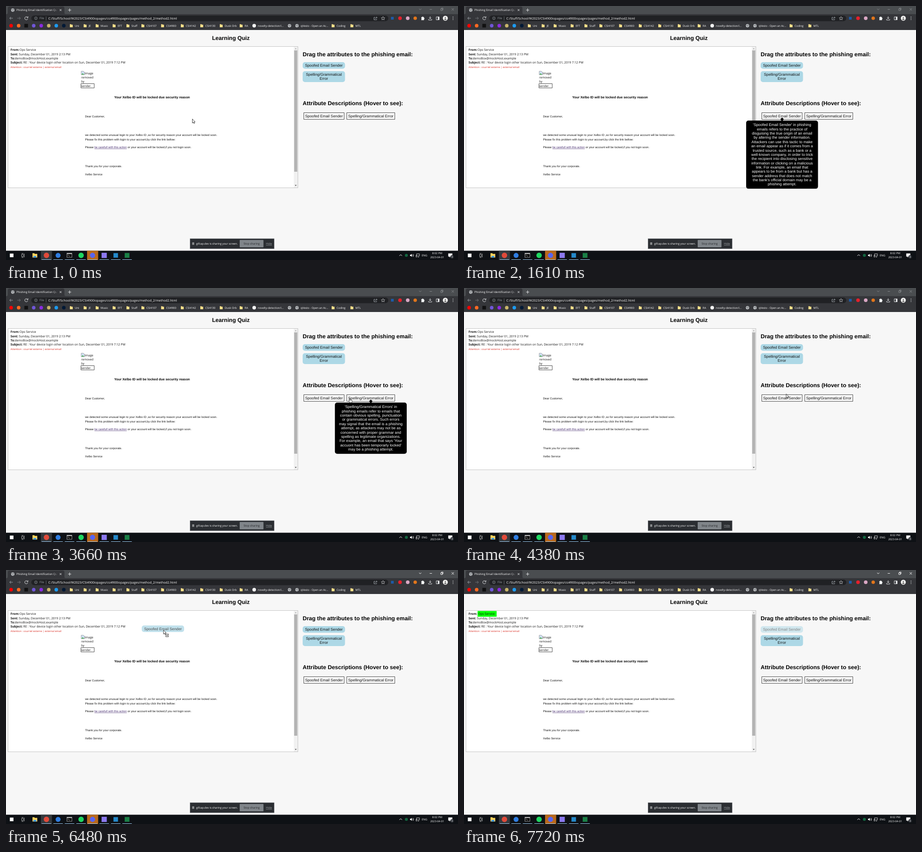
Write an HTML page that moves like this. It is 998 px wide and 561 px high and loops after 8 s.

```html
<!DOCTYPE html>
<html lang="en">
<head>
<meta charset="utf-8">
<title>Learning Quiz</title>
<style>
  html, body { margin: 0; width: 100%; height: 100%; overflow: hidden; background: #f7f7f7; }
  svg { display: block; width: 100vw; height: 100vh; text-rendering: geometricPrecision; }
  text { font-family: "Liberation Sans", Arial, sans-serif; white-space: pre; }
  .ui { font-family: "Open Sans", "Noto Sans", sans-serif; }
  .mid { text-anchor: middle; }
  .b { font-weight: 700; }
  .line { fill: none; stroke-width: 1; }
  .thin { fill: none; stroke-width: .75; }
</style>
</head>
<body>
<svg id="stage" viewBox="0 0 998 561" preserveAspectRatio="none"></svg>
<script>
const rect = (x, y, w, h, fill, more = '') => `<rect x="${x}" y="${y}" width="${w}" height="${h}" fill="${fill}" ${more}/>`;
const dot = (x, y, r, fill) => `<circle cx="${x}" cy="${y}" r="${r}" fill="${fill}"/>`;
const square = (x, y, size, fill) => rect(x - size / 2, y - size / 2, size, size, fill);
const line = (d, stroke, cls = 'line') => `<path class="${cls}" d="${d}" stroke="${stroke}"/>`;
const thin = (d, stroke) => line(d, stroke, 'thin');
const shape = (d, fill, more = '') => `<path d="${d}" fill="${fill}" ${more}/>`;
const text = (x, y, str, size, fill = '#000', cls = '', more = '') =>
  `<text x="${x}" y="${y}" font-size="${size}" fill="${fill}" class="${cls}" ${more}>${str}</text>`;
const ui = (x, y, str, size = 6.07, fill = '#fff', cls = '') => text(x, y, str, size, fill, 'ui ' + cls);
const group = (id, body, more = '') => `<g id="${id}" ${more}>${body}</g>`;
const bold = str => `<tspan class="b">${str}</tspan>`;
const globe = (x, y) => dot(x, y, 3.7, '#c4c7ca') +
  line(`M${x - 3} ${y - 1}l3 1 1 3M${x} ${y - 3}l1 2 2 0`, '#55585b');
const folder = (x, y) => shape(`M${x - 3} ${y - 3.3}h2.6l1 1.1h2.8v5.6h-6.4z`, '#fbe08a');

function browser() {
  const pale = '#e4e6e8', grey = '#9aa0a6';
  let s = rect(0, 0, 998, 19, '#4a4d50') + rect(0, 18, 998, 35, '#35363a');
  s += shape('M1 18q3 0 3-3V5q0-4 4-4h117q4 0 4 4v10q0 3 3 3z', '#35363a');
  s += globe(15, 9);
  s += `<defs><linearGradient id="fade" gradientUnits="userSpaceOnUse" x1="104" x2="114" y1="0" y2="0">
    <stop stop-color="#fff"/><stop offset="1" stop-color="#fff" stop-opacity="0"/></linearGradient></defs>`;
  s += ui(23, 11.2, 'Phishing Email Identification Qu', 6.07, 'url(#fade)');
  s += line('M118.500 7l4 4m0-4l-4 4M137 9h7m-3.500-3.500v7', pale);
  s += group('windowButtons', line('M912 6l2.500 2.500L917 6M935.500 7.500h5M960 6h3.500v4H960zM961.500 6V4.500h3.500v4h-1.500M984 5l5 5m0-5l-5 5', 'currentColor'));
  s += line('M15 27H8m3-3l-3 3 3 3', grey) + line('M25 27h7m-3-3l3 3-3 3', '#707478');
  s += line('M47.500 25a3.400 3.400 0 1 0 .6 3M48.500 23v2.800h-2.800', pale);
  s += rect(56, 21, 788, 12.5, '#202124', 'rx="6.2"');
  s += thin('M69 27a3 3 0 1 1-6 0a3 3 0 1 1 6 0M66 26.500v2.500M66 25v.8', grey);
  s += ui(74, 29.4, 'File', 6.4, grey) + line('M88.500 23v9', '#5f6368');
  s += ui(93.5, 29.6, 'C:/Stuff/School/W2023/CSI4900iopages/csi4900iopages/pages/method_2/method2.html', 6.95);
  s += line('M815 25h-2.500v5.500h6V29M815 28.500q0-3 4-3m-1.500-2l2 2-2 2', grey);
  s += thin('M832.500 23.300l1.200 2.500 2.700.3-2 1.900.6 2.700-2.500-1.400-2.500 1.400.6-2.700-2-1.900 2.700-.3z', pale);
  s += square(853, 27, 6, '#1d5aa6') + dot(870, 27, 4, '#e4202c') + dot(887, 27, 4, '#d9a7c4') + dot(903.5, 27, 3.8, '#e2761b');
  s += shape('M917 24.500h2v-1h2v1h2v2.300h1v2h-1v2.400h-6v-2q1.500-.8 0-2z', '#f1f3f4');
  s += line('M936.500 23v5m-2.500-2.300l2.500 2.500 2.500-2.500M933 29v2h7v-2', pale);
  s += line('M950 24h6.500v6.500H950z', pale) + rect(953.5, 24, 3, 6.5, pale);
  s += dot(970, 27, 5.5, '#f5f5f3') + dot(970, 25.5, 1.5, '#777') + shape('M967.500 31q0-3.500 2.500-3.500t2.500 3.500z', '#777');
  s += [24, 27, 30].map(y => dot(987, y, .8, pale)).join('');

  const marks = ['#f00', '#ff6a22', '#111', '#7056d8', '#8a2be2', '#c8b56a', '#1d9bf0', '#001935'];
  s += marks.map((c, i) => (i === 2 ? square : dot)(11.3 + i * 16.62, 43.5, i === 2 ? 8 : 3.9, c)).join('');
  const folders = [[144, 'Uni'], [174.5, 'JE'], [201, 'Music'], [238.5, 'EFT'], [269, 'Stuff'], [302, 'CSI4107'],
    [345.5, 'CSI4900'], [389, 'CSI4142'], [432, 'CSI4130'], [475, 'Dusk Orb'], [519, 'RA'], [722, 'Coding'], [763.5, 'MTL']];
  s += folders.map(([x, name]) => folder(x, 43.5) + ui(x + 8, 45.7, name, 6)).join('');
  s += dot(548, 43.5, 4, '#f2f2f2') + ui(556, 45.7, 'novelty-detection/i...', 6);
  s += globe(626, 43.5) + globe(642.5, 43.5) + ui(650.5, 45.7, 'qVesto - Open an Ac...', 6);
  return s;
}

function email() {
  const body = (y, str) => text(174.5, y, str, 6.24, '#111');
  const head = (y, str) => ui(10, y, str, 6.7, '#111');
  let s = rect(4.5, 89.5, 640, 312, '#fff', 'stroke="#c4c4c4"');
  s += rect(635.5, 90, 8.5, 311, '#f1f1f1') + rect(636.3, 98, 6.8, 268, '#b3b3b3');
  s += shape('M637.700 95.300h4l-2-2.400z', '#a3a3a3') + shape('M637.700 395.300h4l-2 2.400z', '#505050');
  s += rect(30, 90.5, 42, 12.7, '#0f0', 'id="highlight"');
  s += head(99.3, bold('From:')) + group('sender', ui(30, 99.3, 'Ops Service', 6.7, '#111'));
  s += head(108.6, bold('Sent:') + ' Sunday, December 01, 2019 2:13 PM');
  s += head(117.9, bold('To:') + 'demoBox@mockHost.example');
  s += head(127.2, bold('Subject:') + ' RE : Your device login other location on Sun, December 01, 2019 7:12 PM');
  s += ui(10, 136.5, 'Attention : courriel externe | external email', 5.57, '#d8281e');
  s += shape('M166 144h5l2.500 2.500v5.500H166z', '#cfe0f5', 'stroke="#888" stroke-width=".7"') + shape('M166.500 151.600l2.500-3 4 3z', '#4caf50');
  s += ['Image', 'removed', 'by', 'sender.'].map((w, i) => ui(i ? 166 : 174, 150.5 + i * 9.4, w, 6.5, '#111')).join('');
  s += thin('M165.500 171.500h29.300v9.500h-29.300z', '#111');
  s += text(239, 204.2, 'Your Xelbo ID will be locked due security reason', 7.28, '#000', 'b');
  s += body(245.7, 'Dear Customer,');
  s += body(287.3, 'we detected some unusual login to your Xelbo ID ,so for security reason your account will be locked soon.');
  s += body(296.7, 'Please fix this problem with login to your account,by click the link bellow:');
  s += body(314.3, 'Please <tspan fill="#41266b" text-decoration="underline">be carefull with this action</tspan> or your account will be locked,if you not login soon.');
  return s + body(355.7, 'Thank you for your corporate.') + body(374.4, 'Xelbo Service');
}

const chip = rect(655, 124, 93.5, 14.5, '#add8e6', 'rx="5"') + text(701.8, 134.1, 'Spoofed Email Sender', 8.32, '#111', 'mid');

function panel() {
  const heading = (y, str) => text(655, y, str, 12.48, '#000', 'b');
  const box = (x, w, str) => thin(`M${x} 235.600h${w}v14.800h-${w}z`, '#111') + text(x + w / 2, 245.7, str, 8.32, '#111', 'mid');
  let s = heading(110.6, 'Drag the attributes to the phishing email:') + group('chip', chip);
  s += rect(655, 144, 93.5, 24, '#add8e6', 'rx="5"');
  s += text(701.8, 153.9, 'Spelling/Grammatical', 8.32, '#111', 'mid') + text(701.8, 163.2, 'Error', 8.32, '#111', 'mid');
  s += heading(219.2, 'Attribute Descriptions (Hover to see):');
  return s + box(657.5, 89.2, 'Spoofed Email Sender') + box(752.3, 106.2, 'Spelling/Grammatical Error');
}

function tooltip(id, center, lines) {
  const rows = lines.trim().split('\n').map((row, i) => text(center, 265.4 + i * 9.36, row.trim(), 8.32, '#fff', 'mid'));
  return group(id, rect(center - 79.3, 253, 158.6, rows.length * 9.36 + 10.2, '#000', 'rx="5"') +
    shape(`M${center} 246.300l4 4-4 4-4-4z`, '#000') + rows.join(''));
}

function shareBar() {
  return rect(406.5, 514, 185.5, 22, '#2b2e32', 'stroke="#54585c" stroke-width=".7"') +
    line('M412 522v5.500m2.500 0v-5.500', '#fff') + ui(420, 527, 'gifcap.dev is sharing your screen.', 5.95) +
    rect(516, 516.7, 52.5, 16.3, '#80858a', 'rx="1"') + ui(542.2, 527, 'Stop sharing', 6.1, '#222528', 'mid') +
    text(574, 527, 'Hide', 6.1, '#a4a8ac', 'ui', 'text-decoration="underline"');
}

function taskbar() {
  let s = rect(0, 540.5, 998, 21, '#0e1115') + rect(77, 540.5, 24.5, 21, '#353a3e') + rect(179, 540.5, 24.5, 21, '#b9691c');
  s += square(12.5, 550.8, 8, '#fff');
  s += thin('M34.500 548.500h4v5h-4zM40.500 547v8M34.500 546.500h4m-4 9h4', '#d8d8d8');
  s += shape('M58.500 546h4l1 1.500h5.500v8H58.500z', '#ffd45e') + rect(60.5, 552, 6.5, 3.5, '#3d9be0');
  s += dot(89.3, 550.8, 6, '#e04a3a') + dot(115, 550.8, 5.5, '#2f7de1');
  s += rect(134.5, 546, 11, 9, '#080808', 'stroke="#bbb" stroke-width=".8"') + rect(134.5, 546, 11, 1.8, '#ccc') +
    thin('M136.500 549.500l1.500 1-1.500 1m2.500.5h2', '#eee');
  s += dot(165.8, 550.8, 6, '#1ed760') + dot(191, 550.8, 5.7, '#5865f2') + square(216.8, 550.8, 11.5, '#8c79f0');
  s += square(242.3, 550.8, 10, '#2489ca') + square(267.3, 550.8, 10.5, '#1a7f46');
  s += [89.3, 115, 140.3, 165.8, 191, 216.8, 242.3, 267.3].map(x => rect(x - 10.5, 559.8, 21, 1.2, '#8fb9dc')).join('');
  s += line('M868.500 552l3-3 3 3', '#fff') + dot(884, 550.8, 3.3, '#12653f');
  s += shape('M892 549.500h1.700l2.300-2v6.600l-2.300-2H892z', '#fff') + thin('M897.500 549q1.500 2 0 3.800m1.300-5q2.800 3 0 6.200', '#fff');
  s += thin('M906.500 547.500h6.500v4.500h-6.500zM909 554.500h3M905.500 550v4.500h2', '#fff');
  s += ui(918, 553, 'ENG', 6) + ui(952, 548.2, '8:02 PM', 5.9, '#fff', 'mid') + ui(952, 557, '2023-04-01', 5.9, '#fff', 'mid');
  return s + shape('M976.500 546.500h9v7h-4l-2 2v-2h-3z', '#fff') + dot(985, 554, 3.7, '#30343a') + ui(985, 556, '5', 5.4, '#fff', 'mid');
}

const outline = 'stroke="#111" stroke-width=".8" stroke-linejoin="round"';
const cursor = group('cursor',
  group('arrow', shape('M0 0v9l2-1.900 1.500 3 1.300-.6-1.400-2.900h2.800z', '#fff', outline)) +
  group('hand', shape('M-.8.500q.8-1 1.600 0v3.500l3.700.9q1 .3.800 1.500l-.8 3.600H.2L-2.500 6q.2-1 1.700.2z', '#fff', outline)) +
  group('badge', rect(5, 9, 6, 6, '#fff', 'stroke="#222" stroke-width=".8"') + thin('M6.300 12h3.400M8 10.300v3.400', '#222')));

const stage = document.getElementById('stage');
stage.innerHTML = rect(0, 0, 998, 561, '#f7f7f7') + browser() +
  text(496.5, 75.3, 'Learning Quiz', 12.48, '#000', 'b mid') + email() + panel() +
  tooltip('tip1', 702.3, `'Spoofed Email Sender' in phishing
    emails refers to the practice of
    disguising the true origin of an email
    by altering the sender information.
    Attackers can use this tactic to make
    an email appear as if it comes from a
    trusted source, such as a bank or a
    well-known company, in order to trick
    the recipient into disclosing sensitive
    information or clicking on a malicious
    link. For example, an email that
    appears to be from a bank but has a
    sender address that does not match
    the bank's official domain may be a
    phishing attempt.`) +
  tooltip('tip2', 805.5, `'Spelling/Grammatical Errors' in
    phishing emails refer to emails that
    contain obvious spelling, punctuation
    or grammatical errors. Such errors
    may signal that the email is a phishing
    attempt, as attackers may not be as
    concerned with proper grammar and
    spelling as legitimate organizations.
    For example, an email that says 'Your
    accuont has been temporarly locked'
    may be a phishing attempt.`) +
  shareBar() + taskbar() + group('ghost', chip, 'opacity=".75"') + cursor;

const el = id => document.getElementById(id);
const show = (id, on) => el(id).setAttribute('visibility', on ? 'inherit' : 'hidden');
const move = (id, x, y) => el(id).setAttribute('transform', `translate(${x} ${y})`);

// Pointer moves: start, end, steps, target x, y, easing power (negative eases out).
const grab = { x: 703, y: 134 };
const moves = [
  [90, 530, 7, 676, 244, 1.2],
  [1610, 2080, 7, 785, 244, 1.2],
  [3660, 3890, 4, 712, 242, -1.53],
  [4290, 5060, 11, grab.x, 132, 1.53],
  [5230, 6000, 11, 452, 132, 2.565],
  [6090, 6160, 2, 390, 137, 1],
  [6480, 7250, 11, 47, 101, -1.38],
  [7340, 7550, 4, 46, 98, 1]
];
const ease = (p, k) => k > 0 ? p ** k : 1 - (1 - p) ** -k;

function pointerAt(t) {
  let x = 411.5, y = 249.5;
  for (const [start, end, steps, toX, toY, power] of moves) {
    if (t < start) break;
    const step = Math.floor((t - start) * (steps - 1) / (end - start) + 1e-6);
    const p = ease(Math.min(1, (step + 1) / steps), power);
    x += (toX - x) * p;
    y += (toY - y) * p;
  }
  return { x, y };
}

function render(t) {
  const { x, y } = pointerAt(t);
  const dropped = t >= 7720, dragging = t >= 5300 && !dropped;
  const inRow = y > 235 && y < 251;
  const first = inRow && x > 657 && x < 747, second = inRow && x > 752 && x < 859;
  show('tip1', first);
  show('tip2', second);
  show('hand', first || second);
  show('arrow', !(first || second));
  show('badge', dragging);
  show('cursor', !dropped && !(t >= 530 && t < 1680));
  move('cursor', x, y);
  show('ghost', dragging);
  move('ghost', x - grab.x, y - grab.y);
  show('highlight', dropped);
  move('sender', dropped ? 1.5 : 0, 0);
  el('chip').setAttribute('opacity', dropped ? .5 : 1);
  el('windowButtons').setAttribute('color', t >= 5230 ? '#fff' : '#85888b');
}

const begin = performance.now();
(function tick() {
  render((performance.now() - begin) % 8000);
  requestAnimationFrame(tick);
})();
</script>
</body>
</html>
```
